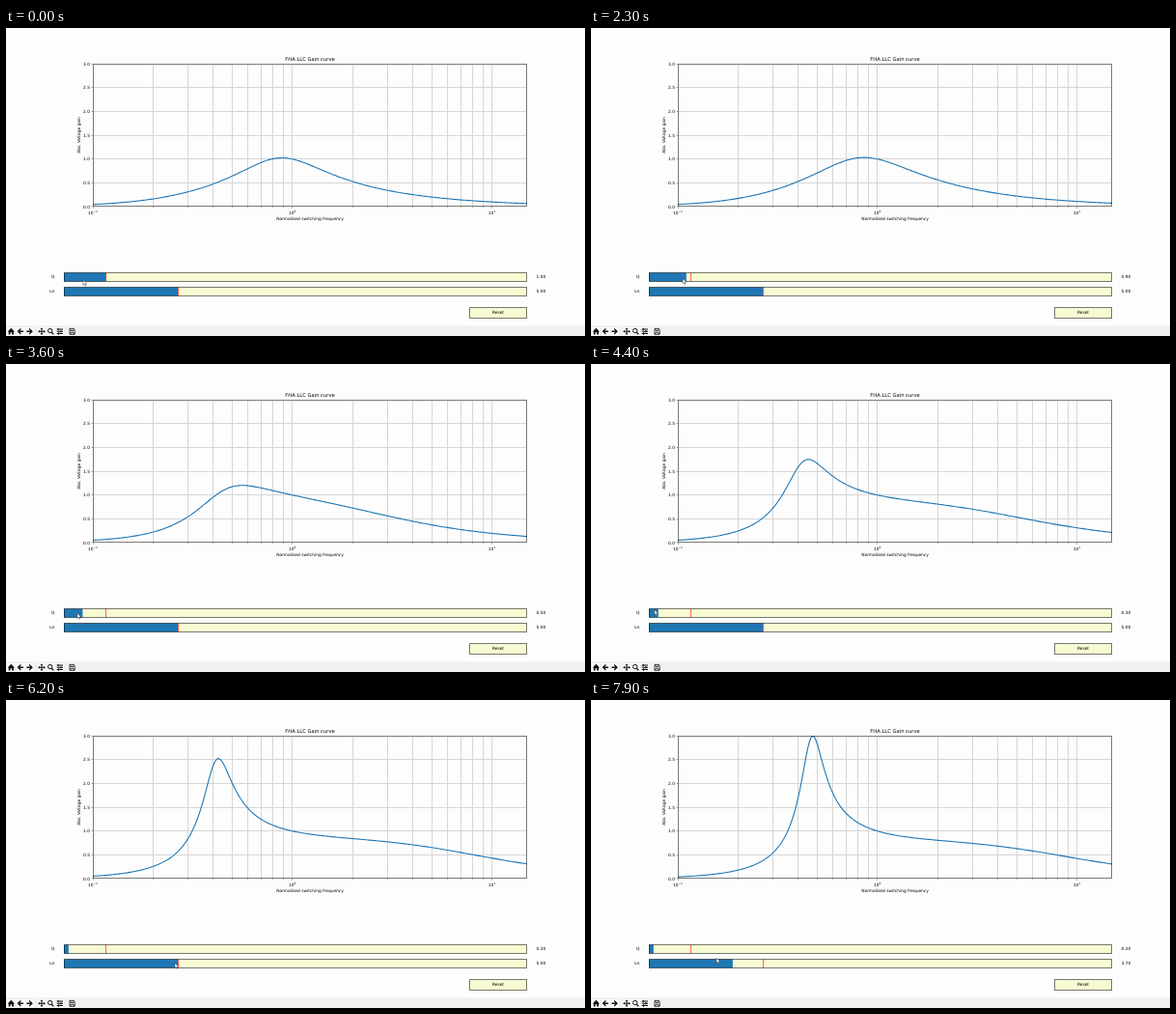
An HTML page for the animation above (8000 ms loop, 600 px wide and 319 px high).

```html
<!DOCTYPE html>
<html lang="en">
<head>
<meta charset="utf-8">
<title>Gain curve</title>
<style>
html, body { margin: 0; width: 100%; height: 100%; overflow: hidden; background: #fdfdfd; }
svg { display: block; width: 600px; height: 319px; }
text { font: 4.34px "DejaVu Sans", sans-serif; text-rendering: geometricPrecision; }
.title { font-size: 5.21px; }
.sup { font-size: 3.04px; }
.mid { text-anchor: middle; }
.end { text-anchor: end; }
.grid { stroke: #d6d6d6; }
.edge { stroke: #000; stroke-opacity: .52; fill: none; }
.tick { stroke: #888; stroke-width: .8; }
.box { fill: #f8fad2; }
.fill { fill: #1f77b4; }
.init { stroke: #f00; stroke-width: 1; stroke-opacity: .6; }
#curve { fill: none; stroke: #1f77b4; stroke-width: 1.1; stroke-linejoin: round; }
.line { fill: none; stroke: #111; stroke-width: 1; }
</style>
</head>
<body>
<svg viewBox="0 0 600 319">
  <clipPath id="area"><rect x="90" y="37" width="450.5" height="148.5"/></clipPath>
  <g id="grid"></g>
  <path id="curve" clip-path="url(#area)"/>
  <rect class="edge" x="90.5" y="37.5" width="449" height="147"/>
  <g id="labels"></g>
  <text class="mid title" x="315" y="34.2">FHA LLC Gain curve</text>
  <text class="mid" x="315" y="199.4">Normalized switching frequency</text>
  <text class="mid" transform="translate(77.2 111) rotate(-90)">Abs. Voltage gain</text>
  <g id="sliders"></g>
  <rect class="box" x="480.5" y="289.5" width="59" height="11"/>
  <rect class="edge" x="480.5" y="289.5" width="59" height="11"/>
  <text class="mid" x="510" y="296.2">Reset</text>

  <rect y="308.5" width="600" height="10.5" fill="#f0f0f0"/>
  <path d="M1 310h8v8.5h-8zM11 310h8v8.5h-8zM20.5 310h8v8.5h-8zM33 310h8v8.5h-8zM42.5 310h8v8.5h-8zM52 310h8v8.5h-8zM64.5 310h8v8.5h-8z" fill="#fafafa"/>
  <g fill="#111">
    <path d="M5.3 310.8 8.9 314.4H7.9V317.4H6.1V315.2H4.5V317.4H2.7V314.4H1.7Z"/>
    <path id="back" d="M11.6 314.2 14.9 311 15.8 311.9 14.2 313.5H18V314.9H14.2L15.8 316.5 14.9 317.4Z"/>
    <use href="#back" transform="matrix(-1 0 0 1 39.4 0)"/>
    <path d="M37 310.4 38.5 312.1H37.5V313.7H39.1V312.7L40.8 314.2 39.1 315.7V314.7H37.5V316.3H38.5L37 318 35.5 316.3H36.5V314.7H34.9V315.7L33.2 314.2 34.9 312.7V313.7H36.5V312.1H35.5Z"/>
    <path d="M52.6 311.6h1v-.8h1v.8h4.4v.9h-4.4v.8h-1v-.8h-1zM52.6 313.8h3.8v-.8h1v.8h1.6v.9h-1.6v.8h-1v-.8h-3.8zM52.6 316.1h1.4v-.8h1v.8h4v.9h-4v.8h-1v-.8h-1.4z"/>
  </g>
  <circle class="line" cx="45.7" cy="313.5" r="2.2"/>
  <path class="line" style="stroke-width:1.4" d="M47.3 315.2 49.3 317.4"/>
  <path class="line" style="stroke-width:.8" d="M65.9 311.3H70.3L71.2 312.2V317.3H65.9ZM67 311.3V313.4H69.8V311.3M67 317.3V315.2H70.1V317.3"/>

  <path id="cursor" d="M0 0V5.3L1.2 4.2 2 6.1 2.9 5.7 2.1 3.9H3.8Z" fill="#fff" stroke="#111" stroke-width=".4"/>
</svg>
<script>
const $ = id => document.getElementById(id);
const LEFT = 90, BOTTOM = 185.1, DECADE = 450 / Math.log10(150), UNIT = 148.1 / 3;
const px = f => LEFT + DECADE * (Math.log10(f) + 1);
const py = g => BOTTOM - UNIT * g;
const snap = v => Math.floor(v + .05) + .5;
const line = (cls, x1, y1, x2, y2) =>
  `<line class="${cls}" x1="${x1}" y1="${y1}" x2="${x2}" y2="${y2}"/>`;

// Axes
let grid = '', labels = '';
for (let e = -1; e <= 1; e++) {
  for (let k = 1; k < 10; k++) {
    const f = k * 10 ** e;
    if (f > 15) break;
    const x = snap(px(f));
    if (f > .1) grid += line('grid', x, 38, x, 184);
    labels += line('tick', x, 185, x, k === 1 ? 186.7 : 186);
  }
  labels += `<text class="mid" x="${px(10 ** e)}" y="192.6">10<tspan class="sup" dy="-1.6">${e < 0 ? '\u22121' : e}</tspan></text>`;
}
for (let g = 0; g <= 3; g += .5) {
  const y = g ? snap(py(g)) : 184.5;
  if (g % 3) grid += line('grid', 91, y, 539, y);
  labels += line('tick', 88.6, y, 90, y) +
    `<text class="end" x="87" y="${py(g) + 1.6}">${g.toFixed(1)}</text>`;
}
$('grid').innerHTML = grid;
$('labels').innerHTML = labels;

// Sliders
function slider(name, y, max, init) {
  const pos = v => 480 * (v - .1) / (max - .1);
  const x = snap(60 + pos(init));
  $('sliders').insertAdjacentHTML('beforeend',
    `<rect class="box" x="60.5" y="${y}" width="479" height="9"/>
     <rect class="fill" id="${name}Fill" x="60" y="${y}" height="9"/>
     ${line('init', x, y, x, y + 9)}
     <rect class="edge" x="60.5" y="${y}" width="479" height="9"/>
     <text class="end" x="50.4" y="${y + 5.7}">${name}</text>
     <text id="${name}Val" x="549.6" y="${y + 5.7}"></text>`);
  return v => {
    $(name + 'Fill').setAttribute('width', pos(v));
    $(name + 'Val').textContent = v.toFixed(2);
  };
}
const setQ = slider('Q', 253.5, 10, 1);
const setLn = slider('Ln', 268.5, 20, 5);

// Timelines: [ms, value...]
const qKeys = [[1700, 1], [2500, .8], [3000, .7], [3400, .5], [4300, .3], [4400, .3], [5000, .2]];
const lnKeys = [[6700, 5], [7000, 4.8], [7900, 3.7]];
const mouse = [[0, 80, 261], [300, 80, 261], [1100, 103, 260.2], [1500, 104, 259.3], [1700, 104, 259.3],
  [2500, 92, 259.5], [3000, 84, 259.5], [3400, 76, 259], [4300, 66.2, 255], [4400, 65.7, 254.5],
  [5200, 64, 256], [5900, 168, 273], [6200, 175, 272.4], [6700, 175, 272.4], [7000, 163.4, 272.2], [7900, 130, 267.3]];

function at(keys, t) {
  const i = keys.findIndex(k => k[0] > t);
  if (i < 0) return keys[keys.length - 1].slice(1);
  if (i === 0) return keys[0].slice(1);
  const a = keys[i - 1], b = keys[i], u = (t - a[0]) / (b[0] - a[0]);
  return a.slice(1).map((v, j) => v + (b[j + 1] - v) * u);
}
const step = v => Math.round(v * 10 + 1e-6) / 10;

function gain(f, q, ln) {
  const f2 = f * f;
  return ln * f2 / Math.hypot((ln + 1) * f2 - 1, q * ln * f * (f2 - 1));
}

function draw(t) {
  const q = step(at(qKeys, t)[0]), ln = step(at(lnKeys, t)[0]);
  let d = '';
  for (let x = 0; x <= 450; x += 1.5) {
    const f = 10 ** (x / DECADE - 1);
    d += (d ? 'L' : 'M') + (LEFT + x) + ' ' + py(gain(f, q, ln)).toFixed(2);
  }
  $('curve').setAttribute('d', d);
  setQ(q);
  setLn(ln);
  $('cursor').setAttribute('transform', `translate(${at(mouse, t)})`);
}

const start = performance.now();
let last = -1;
function tick() {
  const t = Math.floor((performance.now() - start) % 8000 / 100) * 100;
  if (t !== last) draw(last = t);
  requestAnimationFrame(tick);
}
tick();
</script>
</body>
</html>
```
